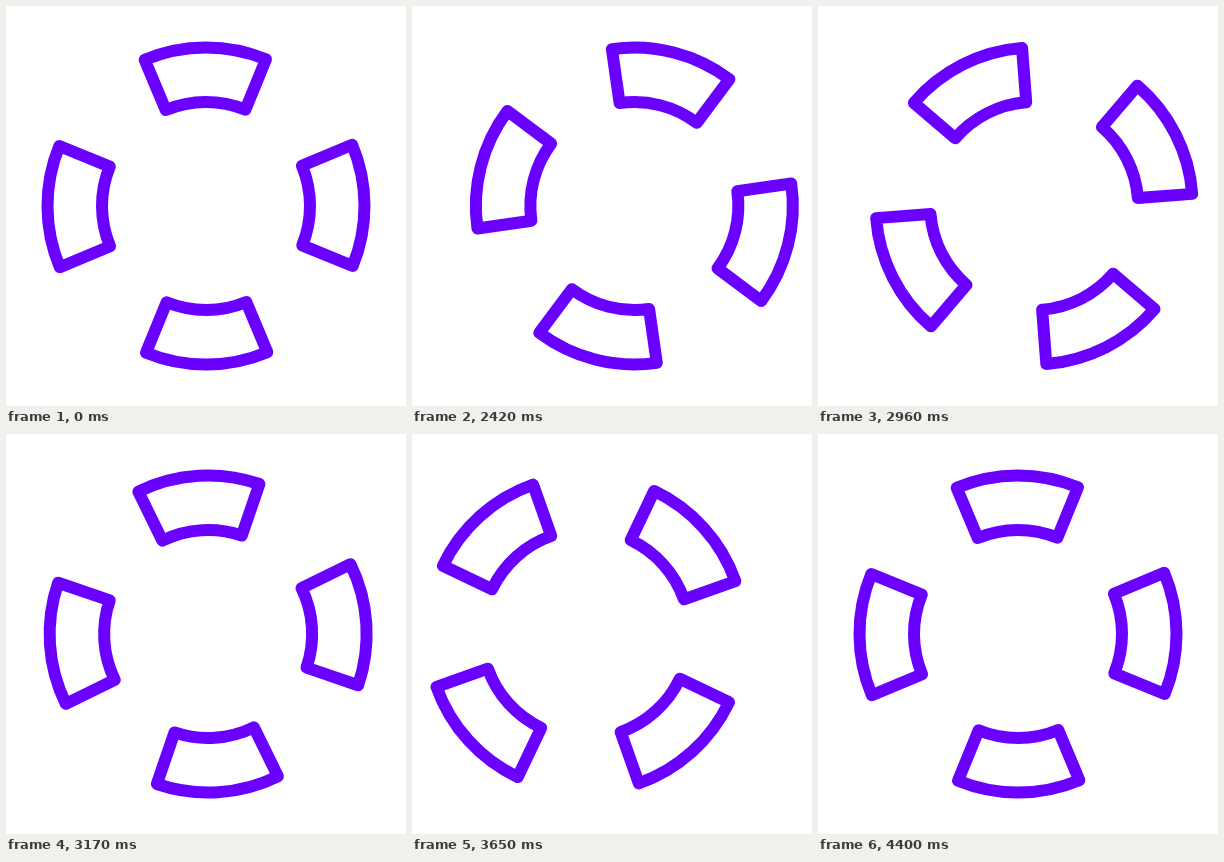
These frames come from a looping animation (400 by 400 pixels, 4.43 s). An HTML page with a canvas:

```html
<!DOCTYPE html>
<html lang="en">
<head>
<meta charset="utf-8">
<title>Rolling ring</title>
<style>
  html, body { margin: 0; width: 100%; height: 100%; overflow: hidden; background: #fff; }
  canvas { display: block; width: 400px; height: 400px; }
</style>
</head>
<body>
<canvas id="stage" width="400" height="400"></canvas>
<script>
const ctx = document.getElementById('stage').getContext('2d');

const LOOP = 4430, HOLD = 2000, MOVE = 2400, STEP = 30;
const OUTER = 158.5, INNER = 104, HALF = Math.PI / 8;
const SWAY = 28.5, TILT = -0.25 * Math.PI / 180;

const clamp = (v, lo, hi) => Math.min(hi, Math.max(lo, v));
const ease = p => p * p * (3 - 2 * p);
const mix = (a, b, p) => a + (b - a) * ease(p);

// Right, across to the left, then back to the middle.
function swayAt(p) {
  if (p < 0.25) return mix(0, SWAY, p / 0.25);
  if (p < 0.75) return mix(SWAY, -SWAY, (p - 0.25) / 0.5);
  return mix(-SWAY, 0, (p - 0.75) / 0.25);
}

function segment(angle) {
  ctx.beginPath();
  ctx.arc(0, 0, OUTER, angle - HALF, angle + HALF);
  ctx.arc(0, 0, INNER, angle + HALF, angle - HALF, true);
  ctx.closePath();
  ctx.stroke();
}

function draw(time) {
  const moved = Math.floor((time - HOLD) / STEP) * STEP;
  const p = clamp(moved / MOVE, 0, 1);

  ctx.setTransform(1, 0, 0, 1, 0, 0);
  ctx.fillStyle = '#fff';
  ctx.fillRect(0, 0, 400, 400);

  ctx.translate(200 + swayAt(p), 200);
  ctx.rotate(TILT + Math.PI * ease(p));
  ctx.strokeStyle = '#6a00ff';
  ctx.lineWidth = 12;
  ctx.lineJoin = 'round';
  for (let i = 0; i < 4; i++) segment(i * Math.PI / 2);
}

const start = performance.now();
function tick() {
  draw((performance.now() - start) % LOOP);
  requestAnimationFrame(tick);
}
tick();
</script>
</body>
</html>
```
